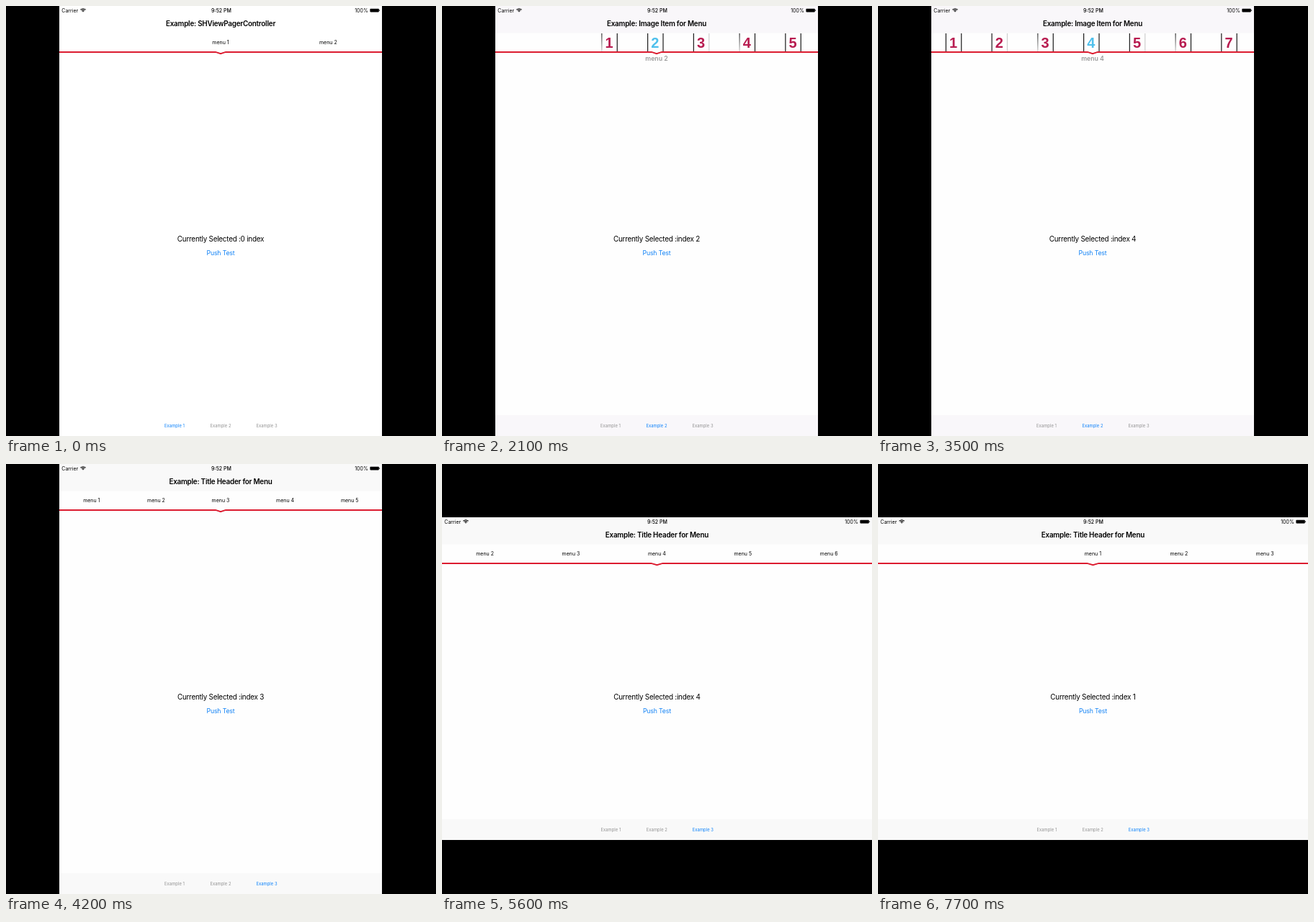
An HTML page that plays this animation: 597x597 px, repeating every 8 s.

```html
<!DOCTYPE html>
<html lang="en">
<head>
<meta charset="utf-8">
<title>Pager menu</title>
<style>
  html, body { margin: 0; width: 100%; height: 100%; overflow: hidden; background: #000; }
  svg { display: block; width: 597px; height: 597px; }
  text { font-family: Inter, Roboto, sans-serif; fill: #000; text-anchor: middle; }
  .status, .menu { font-size: 7px; }
  .clock { font-weight: 500; }
  .start { text-anchor: start; }
  .end { text-anchor: end; }
  .title { font-size: 9.9px; font-weight: 600; letter-spacing: -.024em; }
  .body { font-size: 9.9px; letter-spacing: -.024em; }
  .push { font-size: 8.74px; letter-spacing: -.02em; fill: #0f80f5; }
  .tab { font-size: 5.83px; letter-spacing: .01em; fill: #929292; }
  .tab.on { fill: #0a80fa; }
  .sub { font-size: 8.74px; font-weight: 600; fill: #999; }
  .digit { font: bold 20px "Liberation Sans", Arial, sans-serif; fill: #b81c50; }
  .digit.on { fill: #4fc0ec; }
</style>
</head>
<body>
<svg id="stage" viewBox="0 0 597 597"></svg>
<script>
const LOOP = 8000, STEP = 700;

// Menu entries start at number `first`; `gap` is their pitch as a share of the screen width.
const pages = [
  { title: 'SHViewPagerController', bar: '#ffffff', paper: '#ffffff', gap: 1 / 3, label: n => `${n - 1} index` },
  { title: 'Image Item for Menu', bar: '#f9f7fa', paper: '#fefefe', gap: 1 / 7, images: true, label: n => `index ${n}` },
  { title: 'Title Header for Menu', bar: '#f9f9f9', paper: '#fefefe', gap: 1 / 5, label: n => `index ${n}` }
];

// [page, selected menu, landscape]
const steps = [
  [0, 1], [0, 2], [0, 3],
  [1, 2], [1, 3], [1, 4],
  [2, 3], [2, 4],
  [2, 4, true], [2, 3, true], [2, 2, true], [2, 1, true]
];

const portrait = { x: 74, y: 0, w: 448, h: 597, mid: 298 };
const landscape = { x: 0, y: 74, w: 597, h: 448, mid: 298.4 };

const text = (cls, x, y, s) => `<text class="${cls}" x="${x}" y="${y}">${s}</text>`;
const rect = (x, y, w, h, fill, extra = '') =>
  `<rect x="${x}" y="${y}" width="${w}" height="${h}" fill="${fill}" ${extra}/>`;

function statusBar(s) {
  const right = s.x + s.w, y = s.y;
  const wx = s.x + 33, wy = y + 8.6;
  const arc = r => `M${wx - r * .75} ${wy - r * .72}Q${wx} ${wy - r * 1.28} ${wx + r * .75} ${wy - r * .72}`;
  return text('status start', s.x + 3.3, y + 8.6, 'Carrier')
    + `<path d="${arc(5)}${arc(3.2)}" fill="none" stroke="#000" stroke-width="1"/>`
    + `<path d="M${wx} ${wy}l-1.3 -1.5q1.3 -1 2.6 0z"/>`
    + text('status clock', 299, y + 8.6, '9:52 PM')
    + text('status end', right - 19.2, y + 8.6, '100%')
    + rect(right - 16.6, y + 3.8, 12.4, 4.6, '#000', 'rx=".8"')
    + rect(right - 3.8, y + 5.2, .9, 1.8, '#000', 'rx=".4"');
}

function imageItem(k, n, selected, y) {
  const x = 295.7 + 63.75 * k;
  const phase = (k + 6) % 3;
  const left = phase === 2 ? 'url(#fade)' : '#1c1c1c';
  const right = phase === 1 ? '#cfcfcf' : '#1c1c1c';
  return rect(x - 10.7, y + 38, 1.2, 25, left)
    + rect(x + 10.7, y + 38, 1.2, 25, right)
    + text(selected ? 'digit on' : 'digit', x, y + 58, n);
}

function menu(page, current, s) {
  let out = '';
  for (let k = -3; k <= 3; k++) {
    const n = current + k;
    const x = s.mid + k * page.gap * s.w;
    if (n < 1 || x < s.x || x > s.x + s.w) continue;
    out += page.images ? imageItem(k, n, k === 0, s.y) : text('menu', x, s.y + 53, 'menu ' + n);
  }
  return out;
}

function draw([p, current, wide]) {
  const page = pages[p], s = wide ? landscape : portrait;
  const bottom = s.y + s.h, line = s.y + 64;
  const notch = wide ? 8 : 7;
  let out = `<defs><linearGradient id="fade" x2="0" y2="1">
    <stop stop-color="#333"/><stop offset="1" stop-color="#d0d0d0"/></linearGradient></defs>`;
  out += rect(0, 0, 597, 597, '#000')
    + rect(s.x, s.y, s.w, s.h, page.paper)
    + rect(s.x, s.y, s.w, 37.5, page.bar)
    + rect(s.x, bottom - 29, s.w, 29, page.bar)
    + statusBar(s)
    + text('title', s.mid, s.y + 28.2, 'Example: ' + page.title)
    + menu(page, current, s)
    + `<path d="M${s.x} ${line}H${s.mid - notch}L${s.mid} ${line + 2.2}L${s.mid + notch} ${line}H${s.x + s.w}"
        fill="none" stroke="#dc1c30" stroke-width="1.8"/>`
    + text('body', s.mid, 327.1, 'Currently Selected :' + page.label(current))
    + text('push', s.mid, 346.2, 'Push Test');
  if (page.images) out += text('sub', s.mid, s.y + 76.2, 'menu ' + current);
  for (let i = 0; i < 3; i++) {
    out += text(i === p ? 'tab on' : 'tab', s.mid + (i - 1) * 64, bottom - 12, 'Example ' + (i + 1));
  }
  return out;
}

const stage = document.getElementById('stage');
let shown = -1;
function tick() {
  const i = Math.floor(performance.now() % LOOP / STEP);
  if (i !== shown) stage.innerHTML = draw(steps[shown = i]);
  requestAnimationFrame(tick);
}
tick();
</script>
</body>
</html>
```
